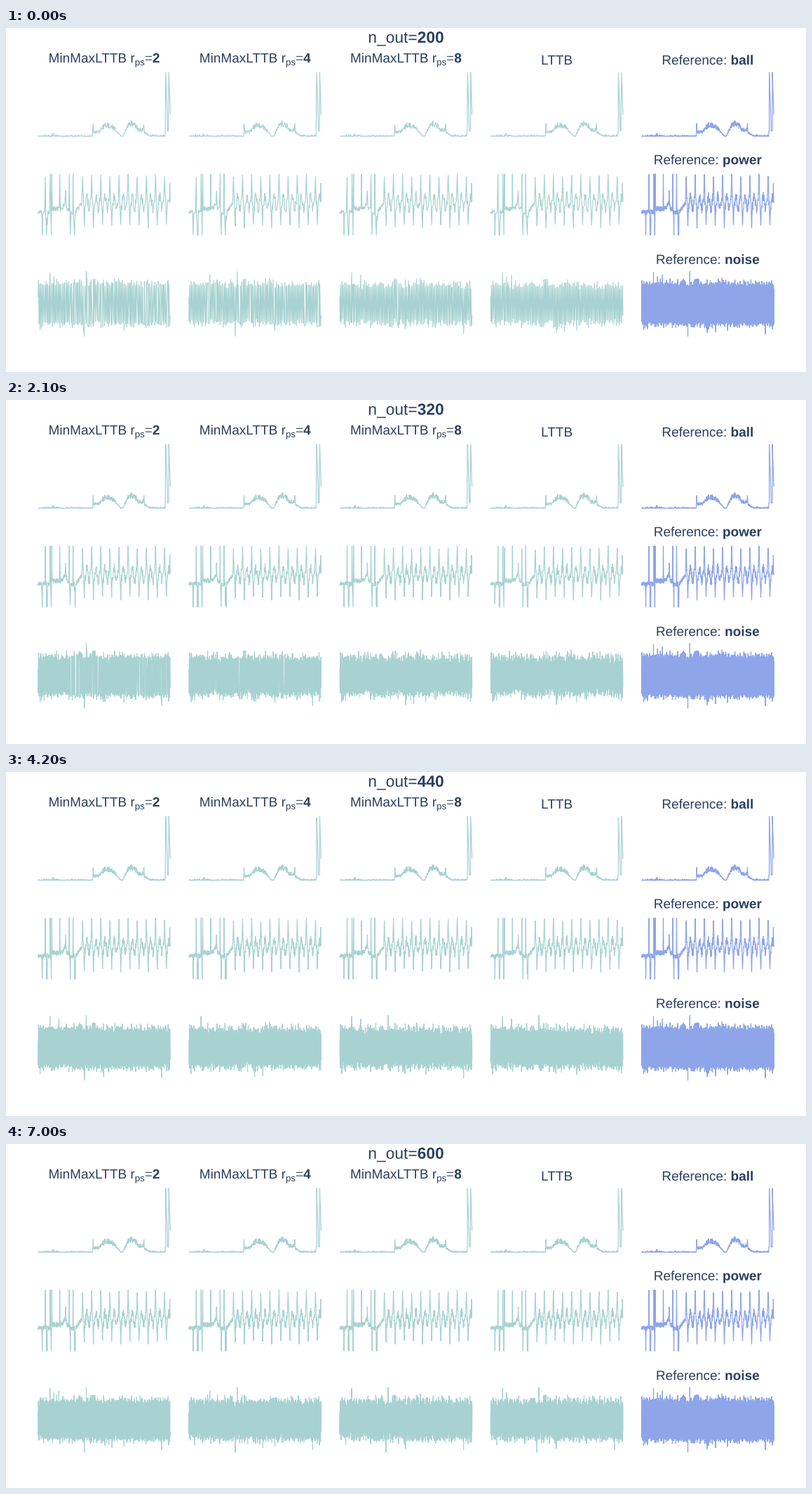
These frames come from a looping animation (1141 px wide and 491 px high, 7.7 s). A matplotlib script:

```python
import numpy as np
import matplotlib.pyplot as plt
from matplotlib.animation import FuncAnimation
from matplotlib.patches import PathPatch
from matplotlib.textpath import TextPath

W, H, DPI = 1141, 491, 64
INK, TEAL, BLUE = "#2a3f5f", "#a8d2d1", "#8ea5e9"
LEFT, PITCH, SPAN = 45.7, 215.2, 188.6
SIZE, HEAD, SUB = 19, 22.8, 13.3
COUNTS = range(200, 601, 40)
RATIOS = (2, 4, 8, None)

plt.rcParams["path.simplify"] = False
rng = np.random.default_rng(7)


# ---- series, in pixels: x from the panel's left edge, y down the stage ----

def wobble(x, step=0.25):
    """Random zigzag between -1 and 1 with a knot every step pixels."""
    knots = np.arange(0, SPAN + step, step)
    return np.interp(x, knots, rng.uniform(-1, 1, len(knots)))


def spikes(x, y, places, peak, half=0.45):
    """Pull y towards peak in a narrow triangle around each place."""
    for pos in places:
        k = np.clip(1 - np.abs(x - pos) / half, 0, 1)
        y = y + (peak - y) * k
    return y


def between(x, lo, hi):
    return (x > lo) & (x < hi)


def arch(x, top, rise, fall):
    """Half cosine wave, 1 at top, with its own width on each side."""
    d = (x - top) / np.where(x < top, rise, fall)
    return np.cos(np.pi / 2 * np.clip(d, -1, 1))


def ball():
    x = np.linspace(0, SPAN, 8000)
    shelves = 6 * between(x, 78.4, 92) + 9 * between(x, 139, 151)
    tail = np.clip(6 - 0.7 * (x - 151), 0, 6) * (x >= 151)
    humps = 16 * arch(x, 98, 14, 20) + 18 * arch(x, 133, 12, 15)
    height = np.maximum(shelves + tail, humps)
    y = 154.3 - height + (0.7 + 0.24 * height) * wobble(x)
    for pos in rng.uniform(3, 180, 45):
        if height[np.searchsorted(x, pos)] < 0.5:
            y = spikes(x, y, [pos], rng.uniform(151.8, 153.4), 0.25)
    y = spikes(x, y, (21, 22.3), 150.5)
    y = spikes(x, y, (78.6, 151), 136, 0.6)
    y = np.where(x > 181.4, 147, y)
    for pos in (182.1, 186.5):
        y = np.where(between(x, pos, pos + 2.5), 63 + 29 * (x - pos), y)
    return x, y


def power():
    x = np.linspace(0, SPAN, 12000)
    first, day = 63.5, 13
    ups = first + day * np.arange(10)
    quiet = 263 - 5 * between(x, 19.3, 44) - 8 * arch(x, 38.5, 4, 3)
    quiet = quiet - 14 * np.clip((x - 53.5) / 9, 0, 1)
    busy = 249 + 9 * np.cos(4 * np.pi * (x - first - 2.9) / day)
    late = x > first
    y = np.where(late, busy, quiet) + np.where(late, 7, 3.7) * wobble(x)
    y = spikes(x, y, (10.4, 17.4, 19.6, 31, 44.5, 50), 208)
    y = spikes(x, y, (6, 12.2, 13, 18.8, 46, 52.2, 53), 296)
    y = spikes(x, y, (39.3,), 232)
    for k, pos in enumerate(ups):
        y = spikes(x, y, [pos], 210 + 2 * np.cos(2 * k), 0.9)
        y = spikes(x, y, [pos + 2.5], 283 + 3 * np.sin(2 * k), 0.8)
    return x, spikes(x, y, [SPAN - 0.7], 221)


def noise():
    x = np.linspace(0, SPAN, 200000)
    y = rng.normal(0, 9.2, len(x))
    for pos, peak in ((17, -45), (68.8, -46.5), (66, 46.5), (105.5, 40), (176.5, 43)):
        y[np.searchsorted(x, pos)] = peak
    return x, 393.7 + np.clip(y, -46.5, 46.5)


# ---- downsampling ----

def minmax(x, y, n):
    edges = np.linspace(1, len(x) - 1, n // 2 + 1).astype(int)
    keep = [0, len(x) - 1]
    for lo, hi in zip(edges[:-1], edges[1:]):
        part = y[lo:hi]
        keep += [lo + part.argmin(), lo + part.argmax()]
    keep = np.unique(keep)
    return x[keep], y[keep]


def lttb(x, y, n):
    edges = np.linspace(1, len(x) - 1, n - 1).astype(int)
    edges = np.r_[edges, len(x)]
    keep, a = [0], 0
    for lo, hi, end in zip(edges[:-2], edges[1:-1], edges[2:]):
        dx = x[hi:end].mean() - x[a]
        dy = y[hi:end].mean() - y[a]
        area = np.abs(dx * (y[lo:hi] - y[a]) - dy * (x[lo:hi] - x[a]))
        a = lo + area.argmax()
        keep.append(a)
    keep.append(len(x) - 1)
    return x[keep], y[keep]


def reduce(x, y, n, ratio):
    if ratio:
        x, y = minmax(x, y, n * ratio)
    return lttb(x, y, n)


# ---- stage ----

fig = plt.figure(figsize=(W / DPI, H / DPI), dpi=DPI, facecolor="white")
ax = fig.add_axes([0, 0, 1, 1])
ax.set(xlim=(0, W), ylim=(0, H))
ax.axis("off")


def glyphs(x, y, text, size, weight):
    font = {"family": "Liberation Sans", "weight": weight}
    return TextPath((x, H - y), text, size=size, prop=font)


def advance(text, size, weight):
    right = [glyphs(0, 0, s, size, weight).get_extents().x1 for s in (text + "|", "|")]
    return right[0] - right[1]


def label(center, y, *runs):
    """Centred line of (text, size, weight, drop) runs; returns each run's patch and x."""
    widths = [advance(*run[:3]) for run in runs]
    x = center - sum(widths) / 2
    out = []
    for (text, size, weight, drop), width in zip(runs, widths):
        patch = PathPatch(glyphs(x, y + drop, text, size, weight), fc=INK, lw=0)
        out.append((ax.add_patch(patch), x))
        x += width
    return out


def plain(text, size=SIZE, drop=0):
    return text, size, "normal", drop


def bold(text, size=SIZE):
    return text, size, "bold", 0


def trace(color):
    return ax.plot([], [], color=color, lw=1.2 * 72 / DPI, snap=False,
                   solid_joinstyle="bevel", solid_capstyle="butt")[0]


def place(line, col, x, y):
    line.set_data(LEFT + PITCH * col + x, H - y)


def middle(col):
    return LEFT + PITCH * col + SPAN / 2


series = {"ball": ball(), "power": power(), "noise": noise()}

title = label(570.5, 21, plain("n_out=", HEAD), bold("200", HEAD))
count, count_x = title[1]

for col, ratio in enumerate(RATIOS):
    if ratio:
        label(middle(col), 49.3, plain("MinMaxLTTB r"), plain("ps", SUB, 4),
              plain("="), bold(str(ratio)))
    else:
        label(middle(col), 52.2, plain("LTTB"))

for row, (name, (x, y)) in enumerate(series.items()):
    label(middle(4), 52.2 + 142.3 * row, plain("Reference: "), bold(name))
    place(trace(BLUE), 4, *minmax(x, y, 3000))

lines = {(name, col): trace(TEAL) for name in series for col in range(len(RATIOS))}


def draw(i):
    n = COUNTS[i]
    count.set_path(glyphs(count_x, 21, str(n), HEAD, "bold"))
    for (name, col), line in lines.items():
        place(line, col, *reduce(*series[name], n, RATIOS[col]))
    return [count, *lines.values()]


anim = FuncAnimation(fig, draw, frames=len(COUNTS), interval=700, repeat=True)
plt.show()
```
